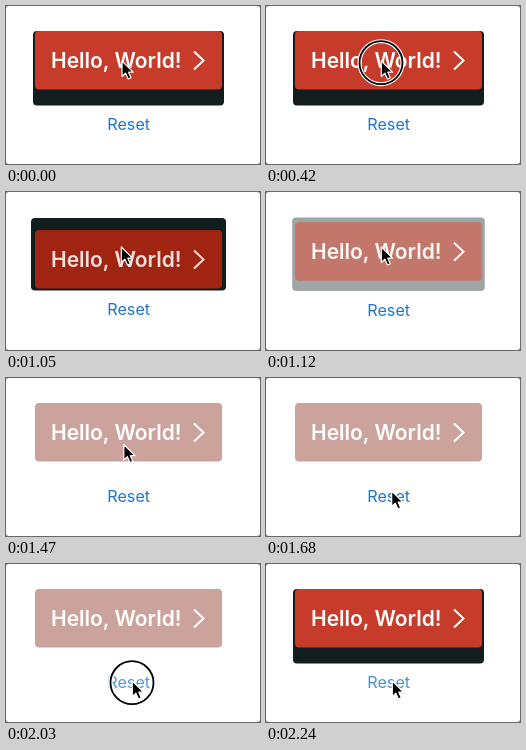
Write an HTML page that moves like this. It is 254x158 px and loops after 2.31 s.

```html
<!DOCTYPE html>
<html lang="en">
<head>
<meta charset="utf-8">
<title>Push button</title>
<style>
  html, body { margin: 0; height: 100%; overflow: hidden; background: #777; }
  svg { display: block; width: 100vw; height: 100vh; }
  text { font-family: Inter, "Open Sans", sans-serif; }
  #label { font-size: 21px; font-weight: 600; fill: #fff; }
  #reset { font-size: 16.2px; fill: #1c76d2; text-anchor: middle; }
</style>
</head>
<body>
<svg viewBox="0 0 254 158">
  <rect width="254" height="158" rx="3" fill="#fff"/>
  <rect id="base" rx="4" fill="#121d1d"/>
  <g id="face">
    <rect id="plate" x="29" y="25" width="187" height="58.5" rx="4"/>
    <g id="content">
      <text id="label" x="45" y="62">Hello, World!</text>
      <path d="M188 45.5l9.5 9-9.5 9" fill="none" stroke="#fff" stroke-width="2"/>
    </g>
  </g>
  <text id="reset" x="122.7" y="124">Reset</text>
  <g id="ring" fill="none">
    <circle r="21.5" stroke="#fff" stroke-width="4"/>
    <circle r="21.5" stroke="#000" stroke-width="1.8"/>
  </g>
  <path id="cursor" d="M0 0V15.5L3.6 12.2 6.2 18 9 16.8 6.5 11.2H11.2Z"
        fill="#000" stroke="#fff" stroke-width="1.2" stroke-linejoin="round"/>
</svg>
<script>
const STEP = 70, STEPS = 33;
const $ = id => document.getElementById(id);
const set = (id, attrs) => {
  for (const name in attrs) $(id).setAttribute(name, attrs[name]);
};

// Tracks are [step, value] pairs, joined by straight lines.
const tracks = {
  press: [[7, 0], [8, .97], [9, 1], [15, 1], [16, .4], [17, 0]],
  off: [[15, 0], [16, .6], [17, 1], [30, 1], [31, .4], [32, 0]],
  ring: [[4, 0], [5, .5], [6, 1], [14, 1], [15, 0], [26, 0], [27, .5], [28, 1], [30, 1], [31, .5], [32, 0]],
  reset: [[28, 1], [29, .75], [31, .75], [32, .8]],
  x: [[0, 116], [1, 115.3], [20, 115.3], [21, 117.8], [22, 121], [23, 124], [24, 125.7], [25, 126.3]],
  y: [[0, 55], [20, 55], [21, 66.5], [22, 85], [23, 103], [24, 113], [25, 117]]
};

function at(name, n) {
  const keys = tracks[name];
  const i = keys.findIndex(k => k[0] > n);
  if (i === 0) return keys[0][1];
  if (i < 0) return keys[keys.length - 1][1];
  const [a, v] = keys[i - 1], [b, w] = keys[i];
  return v + (w - v) * (n - a) / (b - a);
}

const mix = (a, b, k) => a.map((v, i) => v + (b[i] - v) * k);

function draw(now) {
  const n = Math.floor(now / STEP) % STEPS;
  const press = at("press", n), off = at("off", n);
  const x = at("x", n), y = at("y", n);
  const red = mix([198, 59, 41], [161, 36, 18], press);

  set("base", {
    x: 27 - 2 * press, y: 25 + press,
    width: 191 + 4 * press, height: 74.5 - 2 * press,
    opacity: 1 - off
  });
  set("face", { transform: `translate(0 ${13 * press})` });
  set("plate", { fill: `rgb(${mix(red, [203, 163, 156], off).map(Math.round)})` });
  set("content", { opacity: 1 - .14 * press });
  set("reset", { opacity: at("reset", n), y: 124 - press });
  set("ring", { transform: `translate(${x - .3} ${y + 1.7})`, opacity: at("ring", n) });
  set("cursor", { transform: `translate(${x} ${y})` });
}

let start;
function tick(now) {
  start ??= now;
  draw(now - start);
  requestAnimationFrame(tick);
}
draw(0);
requestAnimationFrame(tick);
</script>
</body>
</html>
```
